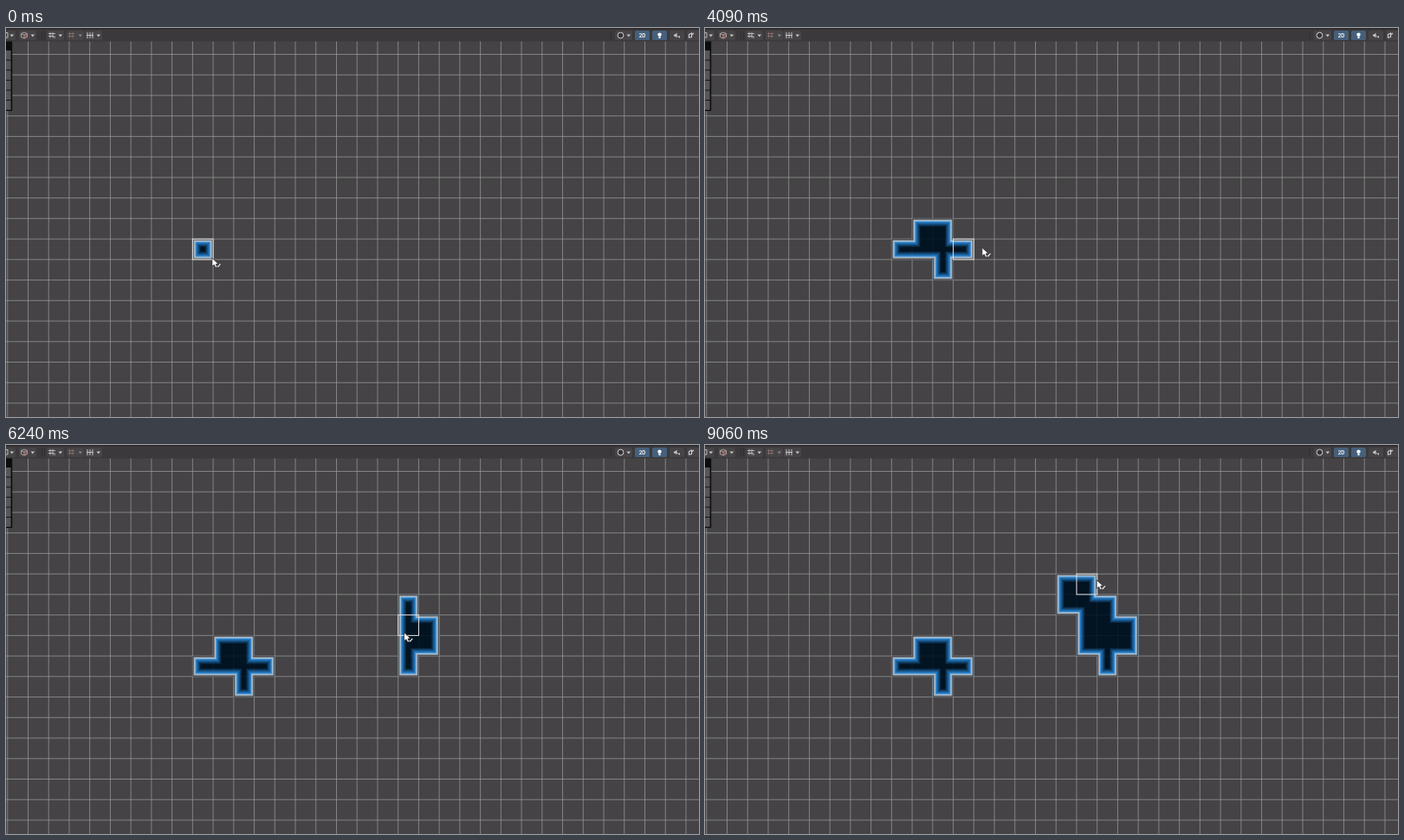
Write an HTML page that moves like this. It is 800 px wide and 450 px high and loops after 9210 ms.

```html
<!DOCTYPE html>
<html lang="en">
<head>
<meta charset="utf-8">
<title>Rule tile painting</title>
<style>
  html, body { margin: 0; width: 100%; height: 100%; overflow: hidden; background: #454345; }
  svg { display: block; width: 800px; height: 450px; }
  text { font: bold 5.5px Inter, Roboto, sans-serif; fill: #fff; }
</style>
</head>
<body>
<svg viewBox="0 0 800 450">
  <defs><clipPath id="inside"><path class="tiles"/></clipPath></defs>
  <rect width="800" height="450" fill="#454345"/>
  <g id="grid"></g>
  <g id="map" clip-path="url(#inside)"></g>
  <use href="#grid" clip-path="url(#inside)" opacity=".1"/>
  <rect id="hover" fill="none"/>
  <g id="panel"></g>
  <g id="toolbar"></g>
  <g id="cursor">
    <path d="M0 0V9.6L2.4 7.7L4.2 11.2L6 10.3L4.3 7L7.2 6.7Z" fill="#fff" stroke="#242326" stroke-width=".7"/>
    <path d="M6 9.4L7 9.9L9.6 6.8" fill="none" stroke="#eee" stroke-width="1.2"/>
  </g>
</svg>
<script>
const LOOP = 9210, CELL = 356 / 15, X0 = 25.5, Y0 = 30.5, HOVER_LAG = 60;
const $ = id => document.getElementById(id);
const gridX = c => X0 + c * CELL;
const gridY = r => Y0 + r * CELL;
const lerp = (a, b, p) => a + (b - a) * p;
const clamp = p => Math.min(1, Math.max(0, p));
const ease = p => p * p * (3 - 2 * p);

function set(el, attrs) {
  for (const name in attrs) el.setAttribute(name, attrs[name]);
  return el;
}
function add(parent, tag, attrs, text = '') {
  const el = set(document.createElementNS('http://www.w3.org/2000/svg', tag), attrs);
  el.textContent = text;
  return parent.appendChild(el);
}
const box = (parent, x, y, width, height, fill, rx = 0) =>
  add(parent, 'rect', { x, y, width, height, fill, rx });
const line = (parent, d, stroke, width = 1) =>
  add(parent, 'path', { d, stroke, 'stroke-width': width, fill: 'none' });

// Thin lines at fractional positions: those that fit one pixel look stronger.
function buildGrid() {
  for (let k = -1; k < 33; k++) {
    line($('grid'), `M${gridX(k)} 0V450`, '#a09fa0', 0.7);
    line($('grid'), `M0 ${gridY(k)}H800`, '#a09fa0', 0.7);
  }
}

function buildToolbar() {
  const bar = $('toolbar');
  const button = (x, w, fill = '#464446') => box(bar, x, 3, w, 11, fill, 1.5);
  const menu = (x, w, fill = '#c8c8c8') => {
    button(x, w);
    add(bar, 'path', { d: `M${x + w - 6.5} 7.4h4.6l-2.3 2.8z`, fill });
  };
  box(bar, 0, 0, 800, 15.5, '#3b393b');
  box(bar, 0, 0, 800, 1.2, '#29272a');
  menu(-9, 20);
  menu(15, 20);
  menu(47, 20);
  menu(70, 20, '#858385');
  menu(91, 20);
  menu(703, 20);
  button(726, 17, '#46607c');
  button(746, 17, '#46607c');
  button(766, 17);
  button(786, 18);
  line(bar, 'M41.5 4V13M44.5 4V13M698 4V13', '#302e30');

  line(bar, 'M0 5.5H2V11H0', '#bbb');
  line(bar, 'M17.5 6.5L21 5L24.5 6.5V10.5L21 12L17.5 10.5ZM17.5 6.5L21 8L24.5 6.5M21 8V12', '#b8aaa7', 0.9);
  box(bar, 21.5, 8.5, 2.5, 2.5, '#a35b50');
  line(bar, 'M49 6.5H57M49 9.5H55M51 4.8V11.5M54 4.8V11.5M56 9V12', '#c4c4c4', 0.9);
  line(bar, 'M72 6.5H79M72 9.5H79M73.5 5V11.5M77 5V11.5', '#86706c', 0.9);
  line(bar, 'M94 5V12M97 5V12M100 5V12M93 8.5H101', '#c4c4c4');
  add(bar, 'circle', { cx: 709.5, cy: 8.5, r: 3.4, fill: '#353436', stroke: '#d0d0d0' });
  add(bar, 'text', { x: 734.5, y: 10.5, 'text-anchor': 'middle' }, '2D');
  add(bar, 'circle', { cx: 754.5, cy: 7.6, r: 2.2, fill: '#fff' });
  box(bar, 753.4, 9.5, 2.2, 2.5, '#e8eef4');
  add(bar, 'path', { d: 'M771 7.5h1.5l2-2v6l-2-2H771z', fill: '#ccc' });
  line(bar, 'M775 9L777.5 11.5M777.5 9V11', '#ccc', 0.9);
  line(bar, 'M788.5 7.5L791.5 6V10.5L788.5 11ZM791.5 8L794 6', '#ccc', 1.2);
}

function buildPanel() {
  const panel = $('panel');
  box(panel, -2, 15, 9.2, 81, '#0d0d0e', 1);
  for (let i = 0; i < 6; i++) box(panel, 0, 26 + i * 11.6, 5.6, 10.7, '#585658');
}

// Nested strokes shade the tiles from the dark core out to a soft pale rim.
function buildTiles() {
  const core = [2, 19, 33], blue = [38, 130, 208], pale = [190, 208, 220], ground = [80, 80, 84];
  const rim = 2.6;
  const mix = (a, b, p) => `rgb(${a.map((v, i) => Math.round(lerp(v, b[i], clamp(p))))})`;
  const shade = depth => depth > 4.2 ? mix(core, blue, (10 - depth) / 5.8)
    : depth > rim ? mix(pale, blue, (depth - rim) / 1.6)
    : mix(pale, ground, (rim - depth) / 1.6);
  add($('map'), 'path', { class: 'tiles', fill: mix(core, core, 0) });
  for (let depth = 10; depth > 0.6; depth -= 0.4)
    add($('map'), 'path', { class: 'tiles', fill: 'none', stroke: shade(depth), 'stroke-width': depth * 2 });
}

// Each gesture walks from cell to cell: u, d, l, r. Capitals also paint the
// cell they reach, P paints in place. gx, gy: where in the last cell the tip rests.
const START = { col: 8, row: 9, gx: 0.95, gy: 0.93 };
const STEPS = { u: [0, -1], d: [0, 1], l: [-1, 0], r: [1, 0], p: [0, 0] };
const gesture = (from, to, steps, gx, gy) => ({ from, to, steps, gx, gy });
const gestures = [
  gesture(520, 1420, 'RRR', 0.1, 0.8),
  gesture(1450, 2360, 'dLuul', 0.5, 0.6),
  gesture(2730, 2900, 'P', 0.23, 0.7),
  gesture(2930, 3240, 'R', 0.5, 0.7),
  gesture(3390, 3520, 'dr', 0.3, 0.4),
  gesture(4000, 4450, 'rrurrurrur', 0.7, 0.6),
  gesture(4450, 5100, 'PDDD', 0.7, 0.8),
  gesture(5100, 5850, 'uRUl', 0.4, 0.6),
  gesture(5880, 6230, '', 0.29, 0.86),
  gesture(6270, 6790, 'LD', 0.5, 0.6),
  gesture(6820, 7500, 'uUL', 0.89, 0.85),
  gesture(7760, 8580, 'UR', 0.1, 0.65),
  gesture(9000, 9060, '', 0.98, 0.3)
];

function stateAt(t) {
  let { col, row, gx, gy } = START, pressed = false;
  const painted = [[col, row]];
  for (const g of gestures) {
    if (t < g.from) break;
    const p = ease(clamp((t - g.from) / (g.to - g.from)));
    [...g.steps].forEach((step, i) => {
      const done = clamp(p * g.steps.length - i), [dc, dr] = STEPS[step.toLowerCase()];
      const paints = step !== step.toLowerCase();
      col += dc * done;
      row += dr * done;
      if (paints && done === 1) painted.push([Math.round(col), Math.round(row)]);
      if (paints && done > 0 && done < 1) pressed = true;
    });
    gx = lerp(gx, g.gx, p);
    gy = lerp(gy, g.gy, p);
  }
  return { col: col + gx, row: row + gy, painted, pressed };
}

// Joins the open cell sides into closed loops around each island.
function outline(cells) {
  const filled = new Set(cells.map(String)), edges = new Map();
  for (const [c, r] of cells) {
    const corners = [[c, r], [c + 1, r], [c + 1, r + 1], [c, r + 1]];
    [STEPS.u, STEPS.r, STEPS.d, STEPS.l].forEach(([dc, dr], i) => {
      if (filled.has(`${c + dc},${r + dr}`)) return;
      const from = String(corners[i]);
      if (!edges.has(from)) edges.set(from, []);
      edges.get(from).push(corners[(i + 1) % 4]);
    });
  }
  let d = '';
  for (const [start, exits] of edges) {
    while (exits.length) {
      let point = start.split(',').map(Number);
      const loop = [];
      while (edges.get(String(point)).length) {
        loop.push(`${gridX(point[0])} ${gridY(point[1])}`);
        point = edges.get(String(point)).pop();
      }
      d += `M${loop.join('L')}Z`;
    }
  }
  return d;
}

function draw(t) {
  const tip = stateAt(t), lagged = stateAt(t - HOVER_LAG);
  const col = Math.floor(lagged.col), row = Math.floor(lagged.row);
  const cells = [...tip.painted];
  if (!cells.some(([c, r]) => c === col && r === row)) cells.push([col, row]);

  const d = outline(cells);
  for (const path of tilePaths) set(path, { d });
  set($('hover'), {
    x: gridX(col), y: gridY(row), width: CELL, height: CELL,
    stroke: tip.pressed ? '#e6e02a' : '#e4e6e7'
  });
  set($('cursor'), { transform: `translate(${gridX(tip.col)} ${gridY(tip.row)})` });
}

buildGrid();
buildToolbar();
buildPanel();
buildTiles();
const tilePaths = document.querySelectorAll('.tiles');
const begin = performance.now();
function tick() {
  draw((performance.now() - begin) % LOOP);
  requestAnimationFrame(tick);
}
tick();
</script>
</body>
</html>
```
